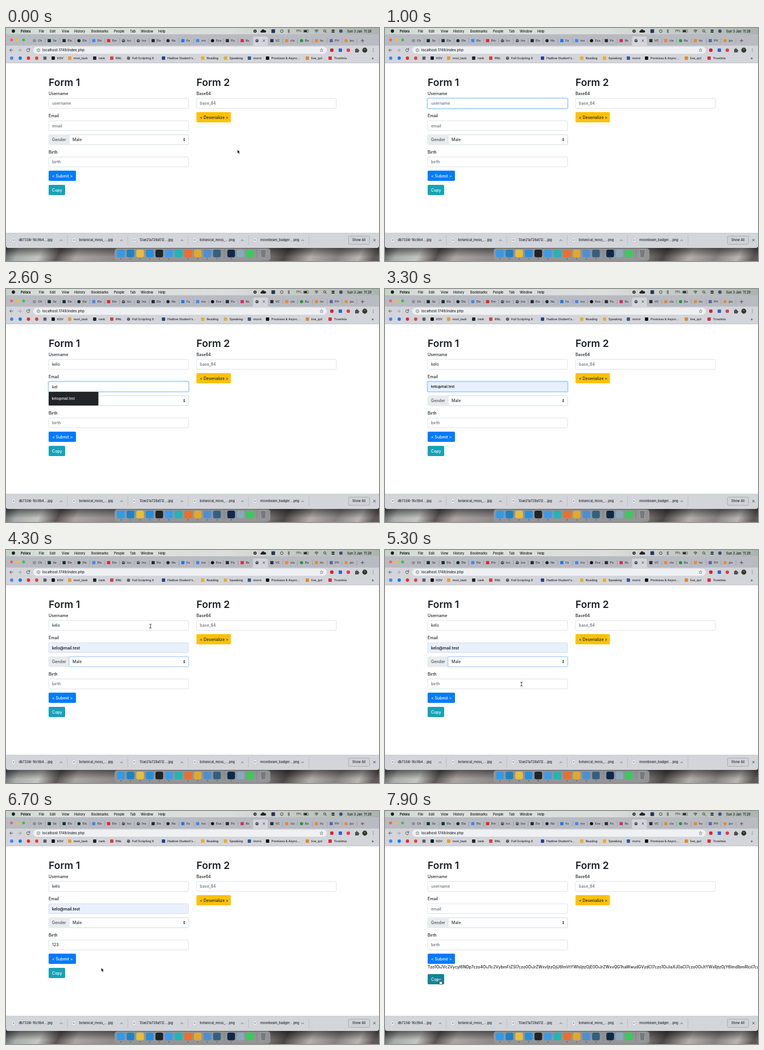
These frames come from a looping animation (656 by 410 pixels, 8000 ms). An HTML page:

```html
<!DOCTYPE html>
<html lang="en">
<head>
<meta charset="utf-8">
<title>Form demo</title>
<style>
  html, body { margin: 0; width: 100%; height: 100%; overflow: hidden; background: #fff; }
  svg { display: block; width: 100%; height: 100%; font-family: Inter, Roboto, sans-serif; }
  text { white-space: pre; }
</style>
</head>
<body>
<svg viewBox="0 0 656 410">
  <defs>
    <linearGradient id="wallpaper" gradientUnits="userSpaceOnUse" x1="0" y1="386" x2="525" y2="648">
      <stop offset="0" stop-color="#55585a"/><stop offset=".04" stop-color="#a9adab"/>
      <stop offset=".1" stop-color="#c4c5c1"/><stop offset=".15" stop-color="#5a5553"/>
      <stop offset=".2" stop-color="#aba5a2"/><stop offset=".3" stop-color="#8f8b8b"/>
      <stop offset=".7" stop-color="#8a8684"/><stop offset=".76" stop-color="#4b4745"/>
      <stop offset=".83" stop-color="#b5afab"/><stop offset=".9" stop-color="#858180"/>
      <stop offset=".96" stop-color="#b9b5b1"/><stop offset="1" stop-color="#5f5a58"/>
    </linearGradient>
    <linearGradient id="shadow" x2="0" y2="1">
      <stop offset="0" stop-opacity=".6"/><stop offset="1" stop-opacity="0"/>
    </linearGradient>
    <linearGradient id="menubar">
      <stop offset="0" stop-color="#c5d2cb"/><stop offset=".12" stop-color="#dce2de"/>
      <stop offset=".6" stop-color="#dadddb"/><stop offset="1" stop-color="#a9b5ae"/>
    </linearGradient>
  </defs>
  <g id="desktop"></g>
  <g id="page"></g>
</svg>
<script>
const LOOP = 8000, STEP = 100;
const USER = 'kelo', EMAIL = 'kelo@mail.test', BIRTH = '123';
const INK = '#1b1f23', BODY = 7, MEDIUM = 'font-weight="500"';
const TOKEN = btoa(`O:5:"Users":4:{s:8:"username";s:4:"${USER}";s:5:"email";s:14:"${EMAIL}";` +
  `s:5:"birth";s:4:"male";s:6:"gender";s:3:"${BIRTH}";}`);

const escapeText = s => s.replace(/&/g, '&amp;').replace(/</g, '&lt;').replace(/>/g, '&gt;');
const text = (x, cy, s, size = BODY, fill = INK, extra = MEDIUM) =>
  `<text x="${x}" y="${cy + size * 0.36}" font-size="${size}" fill="${fill}" ${extra}>${escapeText(s)}</text>`;
const rect = (x, y, w, h, fill, r = 0, extra = '') =>
  `<rect x="${x}" y="${y}" width="${w}" height="${h}" rx="${r}" fill="${fill}" ${extra}/>`;
const dot = (x, y, r, fill, extra = '') =>
  `<circle cx="${x}" cy="${y}" r="${r}" fill="${fill}" ${extra}/>`;
const line = (d, stroke, width = 0.8) =>
  `<path d="${d}" fill="none" stroke="${stroke}" stroke-width="${width}" stroke-linecap="round" stroke-linejoin="round"/>`;
const square = (x, y, size, fill, r = 0.8) => rect(x - size / 2, y - size / 2, size, size, fill, r);
const globe = (x, y) => dot(x, y, 2.8, '#3f4349') +
  line(`M${x - 2} ${y - 0.8}l1.6 .4 1 1.4M${x + 0.6} ${y - 2}l1.2 1.6`, '#d5d8dd', 0.7);
const cross = (x, y, r, color) =>
  line(`M${x - r} ${y - r}l${2 * r} ${2 * r}m0 ${-2 * r}l${-2 * r} ${2 * r}`, color);

function menuBar() {
  const items = [[26, 'Pelora'], [58, 'File'], [77, 'Edit'], [98, 'View'], [120, 'History'], [150, 'Bookmarks'],
    [190, 'People'], [218, 'Tab'], [237, 'Window'], [268, 'Help']];
  return rect(0, 0, 656, 11, 'url(#menubar)') + dot(13, 5.4, 2.8, '#1b1b1d') +
    items.map(([x, s], i) => text(x, 5.5, s, 5.6, '#111', `font-weight="${i ? 500 : 700}"`)).join('') +
    dot(438, 5.5, 2.7, '#222') + dot(438, 5.5, 1, '#ddd') +
    `<path d="M448.500 8a1.900 1.900 0 0 1 .7-3.600 2.900 2.900 0 0 1 5.500-.4 2.100 2.100 0 0 1 1.300 4z" fill="#222"/>` +
    square(470, 5.5, 6.5, '#25345c') + dot(485, 5.5, 2.4, 'none', 'stroke="#222" stroke-width=".8"') +
    line('M495.500 3.800l3.400 3.400-1.700 1.500V2.300l1.700 1.500-3.400 3.400', '#222', 0.6) +
    text(510, 5.5, '71%', 5, '#222') +
    rect(523, 3.2, 9, 4.6, 'none', 1.2, 'stroke="#333" stroke-width=".6"') + rect(524, 4.1, 5.5, 2.8, '#222', 0.6) +
    line('M543 4.300q3-2.600 6 0M544.200 5.900q1.800-1.500 3.600 0', '#222', 0.9) + dot(546, 7.5, 0.7, '#222') +
    dot(560.5, 5, 1.9, 'none', 'stroke="#222" stroke-width=".8"') + line('M562 6.500l1.600 1.700', '#222') +
    rect(572.5, 3, 5.5, 2.1, '#222', 1) + rect(572.5, 6, 5.5, 2.1, '#222', 1) +
    dot(589, 5.5, 3, '#454678');
}

function tabStrip() {
  const tabs = [['Ch', '#8b9096'], ['Se', '#12352b'], ['Ele', '#12352b'], ['Ele', '#12352b'], ['Ele', '#4285f4'],
    ['Em', '#e32626'], ['loc'], ['Ins'], ['Ele', '#25282c'], ['Ne', '#25282c'], ['Fa', '#1877f2'], ['ros', '#4285f4'],
    ['Exa', '#111'], ['Pa', '#2a2d31'], ['Re', '#dd2458'], [''], ['VC', '#2a2d31'], ['cla', '#e58a35'],
    ['Ba', '#1c9b36'], ['ho', '#e58a35'], ['PH', '#5965a8'], ['jso', '#e58a35']];
  const active = 15, pitch = 26.1, cy = 22.2;
  return rect(0, 11, 656, 20, '#b9bbc2') +
    ['#f65f57', '#f9bd2e', '#2bc840'].map((c, i) => dot(9.8 + i * 10.6, 21, 2.5, c)).join('') +
    tabs.map(([label, color], i) => {
      const x = 50 + i * pitch, left = x - 7;
      const icon = color ? (i % 3 ? square(x, cy, 5.6, color) : dot(x, cy, 2.8, color)) : globe(x, cy);
      if (i === active) return `<path d="M${left - 2} 31q2 0 2-2V18q0-3 3-3h20q3 0 3 3v11q0 2 2 2z" fill="#d3d5da"/>` +
        icon + cross(453.5, cy, 1.6, '#333');
      const divider = i === active - 1 ? '' : line(`M${left + pitch} 18.500v8`, '#858991', 0.5);
      return icon + text(x + 6.3, cy, label, 5.3, '#35383d') + divider;
    }).join('') + line('M627 19.700v5.200m-2.600-2.600h5.200', '#33363a');
}

function toolbar() {
  const marks = [[90, 'KOV', '#111'], [119, 'mori_task', '#ee9a28'], [163, 'rank', '#1c252b'], [193, 'RNL', '#d5403a'],
    [222, 'Full Scripting X', ''], [284, "Hadlow Student's...", '#24408f'], [353, 'Reading', '#e7b02a'],
    [393, 'Speaking', '#e7b02a'], [435, 'morvi', '#33578f'], [467, 'Promises & Async...', '#111'],
    [537, 'live_qol', '#e48726'], [577, 'Tovelmis', '#d22f3a']];
  const cy = 53;
  return rect(0, 31, 656, 31, '#d3d5da') + line('M0 61.700h656', '#aeb1b7', 0.6) +
    line('M12 39H6.800m2.400-2.500L6.700 39l2.500 2.500', '#3c4043') +
    line('M21.500 39h5.200m-2.400-2.500l2.500 2.500-2.500 2.500', '#8a8e95') +
    rect(48, 32.8, 516, 12.4, '#eef0f2', 6.2) +
    dot(57, 39, 2.5, 'none', 'stroke="#5f6368" stroke-width=".7"') + line('M57 38.700v1.500m0-2.700v.1', '#5f6368', 0.6) +
    text(64, 38.8, 'localhost:1749/index.php', 6.2, '#26292d') +
    line('M555 36.200l.9 1.900 2 .2-1.500 1.400.4 2-1.800-1-1.800 1 .4-2-1.500-1.400 2-.2z', '#5f6368', 0.6) +
    square(573, 39, 6, '#cf2530', 2) + square(588, 39, 6, '#2f64cc') + dot(602, 39, 3.1, '#e33a45') +
    `<path d="M614 37h1.800q0-1.700 1.200-1.700t1.200 1.700h1.800v1.800q1.600 0 1.600 1.200t-1.600 1.200v1.700h-6z" fill="#4c5055"/>` +
    dot(631, 39, 4.4, '#2e3b2a') + dot(631, 37.8, 1.3, '#776f5b') +
    [36.7, 39, 41.3].map(y => dot(646, y, 0.6, '#44474c')).join('') +
    [['#4285f4', 10], ['#1877f2', 25], ['#e62b2b', 39.5], ['#db4437', 54]].map(([c, x]) => dot(x, cy, 2.9, c)).join('') +
    square(68.5, cy, 5.5, '#565b61') +
    marks.map(([x, label, color]) =>
      (color ? square(x - 7, cy, 5.8, color, 1) : globe(x - 6.5, cy)) + text(x, cy, label, 5.3, '#1f2226')).join('') +
    text(643, cy - 0.5, '»', 6.5, '#333');
}

function downloadShelf() {
  const files = ['db733i6-16c9b4....jpg', 'botanical_moss_....jpg', '13ae21a728a512....jpg',
    'botanical_moss_....png', 'moonbeam_badger....png'];
  return `<path d="M0 361h656v22q0 4-4 4H4q-4 0-4-4z" fill="#d3d5da"/>` + line('M0 360.800h656', '#aeb1b7', 0.6) +
    files.map((name, i) => {
      const x = i * 106.2;
      return rect(x + 10.5, 369.8, 5.2, 7, '#f3f4f5', 0.5, 'stroke="#a9acb1" stroke-width=".4"') +
        square(x + 13.1, 373.2, 2.2, '#8291a1', 0.2) +
        text(x + 22.4, 373.4, name, 5.6, '#222529') +
        line(`M${x + 95} 374.500l1.900-1.900 1.900 1.900`, '#44474c', 0.8) +
        line(`M${x + 108} 365v17`, '#a6a9af', 0.5);
    }).join('') +
    rect(602.3, 366.2, 37, 14.4, '#d0d2d7', 1.8, 'stroke="#8d9096" stroke-width=".6"') +
    text(609, 373.2, 'Show All', 5.6, '#25282c') + cross(648, 373.3, 1.8, '#333');
}

function dock() {
  const apps = ['#2f9bea', '#1d83c5', '#e9bd39', '#2490df', '#202327', '#3b9bea', '#22b5b4', '#ec6e2a', '#e0a92c',
    '#4b8fd8', '#32607f'];
  const pinned = [[396, '#10284a'], [412.5, '#8aa9bc'], [429, '#3acb58']];
  return rect(0, 383, 656, 27, 'url(#wallpaper)') + rect(0, 383, 656, 20, 'url(#shadow)') +
    rect(191, 387.8, 274, 21.4, '#96979b', 5, 'fill-opacity=".9"') +
    apps.map((c, i) => square(202 + i * 16.9, 396.8, 13.4, c, 3.2) +
      (i !== 6 ? dot(202 + i * 16.9, 406.3, 0.7, '#333') : '')).join('') +
    pinned.map(([x, c]) => square(x, 396.8, 13.4, c, 3.2)).join('') + dot(396, 406.3, 0.7, '#333') +
    line('M384 390v15M441.200 390v15', '#77757a', 0.5) +
    `<path d="M447.500 390h10l-1.300 14h-7.400z" fill="#77797d" stroke="#b9babd" stroke-width=".6"/>`;
}

const between = (t, from, to) => t >= from && t < to;
const typed = (t, word, start, gap) => word.slice(0, Math.max(0, Math.floor((t - start) / gap) + 1));

// Shared look of every form control; glow is the opacity of the focus ring.
const box = (x, y, w, glow, fill = '#fff') =>
  (glow ? rect(x - 0.8, y - 0.8, w + 1.6, 18.9, 'none', 2.4, `stroke="#007bff" stroke-opacity="${glow}" stroke-width="1.6"`) : '') +
  rect(x, y, w, 17.3, fill, 1.8, `stroke="${glow ? '#80bdff' : '#c8ced4'}" stroke-width=".6"`);

function input(x, y, placeholder, value = '', { focused, filled, size = BODY, caret } = {}) {
  return box(x, y, 246, focused ? 0.28 : 0, filled ? '#e8f0fe' : '#fff') +
    text(x + 6, y + 8.8, value ? value + (caret ? '|' : '') : placeholder, size,
      !value ? '#666d74' : filled ? '#000' : '#2f353b');
}

const button = (x, y, w, label, fill, color = '#fff') =>
  rect(x, y, w, 18, fill, 1.8) + text(x + 6, y + 9, label, BODY, color);

const suggestions = (y, rows, selected) =>
  rect(75, y, 87.5, rows.length * 16.4 + 7.5, '#232428', 1.2) +
  rows.map((row, i) => (i === selected ? rect(75, y + 4 + i * 16.4, 87.5, 16.4, '#44464b') : '') +
    text(80.5, y + 12 + i * 16.4, row, 5.8, '#f1f2f3')).join('');

const POINTER_PATH = [[100, 407, 214], [600, 256, 135], [1000, 254, 134], [4300, 254, 134], [4700, 262, 196],
  [5000, 262, 196], [5300, 240, 236], [6200, 240, 236], [6600, 167.5, 276], [6700, 167.5, 276], [7200, 98, 262],
  [7600, 98, 262], [7900, 96, 297]];

function pointerAt(t) {
  const next = POINTER_PATH.findIndex(p => p[0] > t);
  if (next === 0) return POINTER_PATH[0].slice(1);
  if (next < 0) return POINTER_PATH[POINTER_PATH.length - 1].slice(1);
  const [t0, x0, y0] = POINTER_PATH[next - 1], [t1, x1, y1] = POINTER_PATH[next];
  const k = (t - t0) / (t1 - t0), ease = k * k * (3 - 2 * k);
  return [x0 + (x1 - x0) * ease, y0 + (y1 - y0) * ease];
}

function pointer(x, y, kind) {
  const shapes = {
    arrow: '<path d="M0 0v6.600l1.500-1.300 1.100 2.400 1.200-.5-1-2.400h2z" fill="#000" stroke="#fff" stroke-width=".5"/>',
    beam: line('M-1.500-3.500Q0-3.500 0-2.500Q0-3.500 1.500-3.500M0-2.500v5M-1.500 3.500Q0 3.500 0 2.500Q0 3.500 1.500 3.500', '#111', 0.8),
    hand: '<path d="M0 .5q.7-.9 1.300 0v2.600q2.700-.1 3.600 1v2.100l-.9 2H.7L-1.500 5q0-1 1.500 0z" fill="#fff" stroke="#000" stroke-width=".6"/>'
  };
  return `<g transform="translate(${x} ${y})">${shapes[kind]}</g>`;
}

function drawPage(t) {
  const done = t >= 7600, loading = between(t, 7400, 7600);
  const focus = between(t, 700, 1900) ? 'user' : between(t, 1900, 3900) ? 'email' :
    between(t, 3900, 5400) ? 'gender' : between(t, 5400, 6700) ? 'birth' : '';
  const user = done ? '' : typed(t, USER, 1100, 100);
  const filled = between(t, 2900, 7600);
  const email = done ? '' : filled ? EMAIL : typed(t, EMAIL.slice(0, 3), 2200, 200);
  const birth = done ? '' : typed(t, BIRTH, 5800, 100);
  const caret = Math.floor(t / 500) % 2 === 0;

  const [px, py] = pointerAt(t);
  const over = (x, y, w) => px >= x && px <= x + w && py >= y && py <= y + 18;
  const copyY = done ? 287 : 276;
  const onSubmit = over(75, 251, 48), onCopy = over(75, copyY, 29);
  const onInput = [124, 163.2, 227].some(y => over(75, y, 246));

  let out = text(600, 5.5, `Sun 3 Jan  11:${t < 2300 ? 28 : 29}`, 5.6, '#111');
  out += loading ? cross(39, 39, 2.1, '#3c4043')
    : line('M41.400 37.600a2.700 2.700 0 1 0 .3 2M41.700 35.800v2.100h-2.100', '#3c4043');

  out += text(75, 95.4, 'Form 1', 17.5, INK, 'font-weight="600"') + text(335, 95.4, 'Form 2', 17.5, INK, 'font-weight="600"') +
    text(75, 115, 'Username') + text(75, 154.2, 'Email') + text(75, 218, 'Birth') + text(335, 115, 'Base64') +
    input(75, 124, 'username', user, { focused: focus === 'user', caret: focus === 'user' && caret }) +
    input(75, 163.2, 'email', email, { focused: focus === 'email', filled,
      size: filled && focus === 'email' ? 5.9 : BODY, caret: focus === 'email' && !filled && caret }) +
    box(75, 187.9, 246, 0) + rect(75.3, 188.2, 36, 16.7, '#e9ecef', 1.5) +
    text(81, 196.6, 'Gender', BODY, '#495057') +
    box(111, 187.9, 210, focus === 'gender' ? 0.1 : 0) + text(117, 196.6, 'Male', BODY, '#2f353b') +
    '<path d="M311.600 195.900l1.800-2.300 1.800 2.300zm0 1.200l1.800 2.300 1.800-2.300z" fill="#343a40"/>' +
    input(75, 227, 'birth', birth, { focused: focus === 'birth', caret: focus === 'birth' && caret }) +
    input(335, 124, 'base_64') +
    button(335, 148, 60.5, '< Deserialize >', '#ffc107', INK) +
    (loading ? rect(74, 250, 50, 20, '#9accff', 2.5) : '') +
    button(75, 251, 48, '< Submit >', onSubmit ? '#0069d9' : '#007bff') +
    (done ? text(75, 274.3, TOKEN) : '') +
    button(75, copyY, 29, 'Copy', onCopy ? '#138496' : '#17a2b8');

  if (between(t, 1100, 1800)) out += suggestions(142, [USER]);
  if (between(t, 2200, 3100)) out += suggestions(181, [EMAIL], filled ? 0 : -1);
  if (between(t, 5800, 6700)) out += suggestions(244.7, ['123', '12345312', '1234', '12345']);

  const visible = t < 1000 || between(t, 4000, 5800) || t >= 6300;
  if (visible) out += pointer(px, py, onInput ? 'beam' : onSubmit || onCopy ? 'hand' : 'arrow');
  return out;
}

document.getElementById('desktop').innerHTML =
  menuBar() + tabStrip() + toolbar() + rect(0, 62, 656, 298.5, '#fff') + dock() + downloadShelf();

const page = document.getElementById('page');
let shown = -1;
function tick() {
  const t = Math.floor(performance.now() % LOOP / STEP) * STEP;
  if (t !== shown) page.innerHTML = drawPage(shown = t);
  requestAnimationFrame(tick);
}
tick();
</script>
</body>
</html>
```
